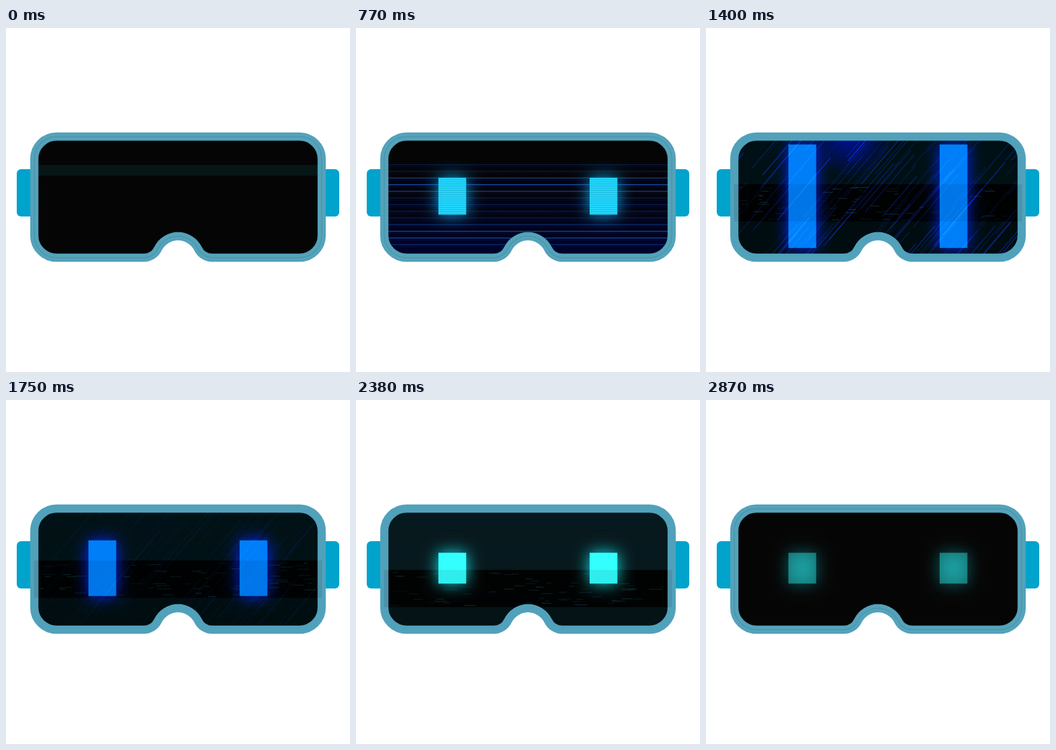
These frames come from a looping animation (480x480 px, 2940 ms). An HTML page with a canvas:

```html
<!DOCTYPE html>
<html lang="en">
<head>
<meta charset="utf-8">
<title>Visor</title>
<style>
html, body { margin: 0; width: 100%; height: 100%; overflow: hidden; background: #fff; }
canvas { display: block; }
</style>
</head>
<body>
<canvas id="stage" width="480" height="480"></canvas>
<script>
const ctx = document.getElementById('stage').getContext('2d');
const LOOP = 2940, STEP = 70;
const HELD = [1, 3, 6, 35, 37]; // steps that repeat the one before
const LEFT = 39, WIDTH = 402, BAND = 52;

// Middle line of the rim, with the arch for the nose
const visor = new Path2D(`M70.5 151.5H409.5A31 31 0 0 1 440.5 182.5V289.5A31 31 0 0 1 409.5 320.5
  H288A22 22 0 0 1 268 308A31.2 31.2 0 0 0 212 308A22 22 0 0 1 192 320.5
  H70.5A31 31 0 0 1 39.5 289.5V182.5A31 31 0 0 1 70.5 151.5Z`);

// Smooth step from 0 to 1 between two times
function ease(t, from, to) {
  const p = Math.min(1, Math.max(0, (t - from) / (to - from)));
  return p * p * (3 - 2 * p);
}
// Rises from a to b, falls from c to d
const pulse = (t, a, b, c, d) => ease(t, a, b) - ease(t, c, d);

const rgb = (c, alpha = 1) => `rgba(${c.map(Math.round).join()},${alpha})`;
const mix = (a, b, p) => a.map((v, i) => v + (b[i] - v) * p);

function random(seed) {
  let s = seed * 7919 + 17;
  return () => (s = (s * 16807 + 11) % 2147483647) / 2147483647;
}

function box(color, x, y, w, h) {
  ctx.fillStyle = color;
  ctx.fillRect(x, y, w, h);
}

const bar = (color, y, h) => box(color, LEFT, y, WIDTH, h);

function drawEyes(t) {
  const blue = pulse(t, 600, 1050, 1800, 2170);
  const h = 43 + 102.5 * pulse(t, 690, 1140, 1360, 2000);
  ctx.save();
  ctx.globalAlpha = ease(t, 350, 700) - 0.6 * ease(t, 2520, 2870);
  ctx.shadowColor = rgb(mix([20, 230, 240], [0, 40, 255], blue));
  ctx.shadowBlur = 22;
  for (const x of [115, 326]) {
    box(rgb(mix([51, 255, 255], [0, 126, 248], blue)), x, 234.7 - h / 2, 38.7, h);
  }
  ctx.restore();
}

function drawStreaks(t, power) {
  const navy = ctx.createLinearGradient(0, 165, 0, 316);
  navy.addColorStop(0, 'rgba(0,2,8,0)');
  navy.addColorStop(1, `rgba(0,4,46,${power})`);
  bar(navy, 150, 176);
  for (let i = 0; i < 13; i++) {
    const y = 158 + (32 + i * 9.3 + (t - 770) * 0.1 + 157) % 157;
    const glow = Math.max(0, Math.cos(i * 0.84 - 2.5));
    bar(`rgba(25,95,210,${(0.25 + 0.5 * glow) * power})`, y, 1.4);
    bar(`rgba(0,20,150,${0.3 * power})`, y + 3, 1);
  }
}

function drawScanlines(alpha) {
  for (let y = 157; y < 318; y += 3) bar(`rgba(0,0,0,${alpha})`, y, 1);
}

function drawRays(t, power) {
  const rnd = random(23);
  ctx.save();
  ctx.globalCompositeOperation = 'lighter';
  const blob = ctx.createRadialGradient(200, 150, 0, 200, 150, 60);
  blob.addColorStop(0, `rgba(0,0,220,${0.6 * power * power})`);
  blob.addColorStop(1, 'rgba(0,0,220,0)');
  box(blob, 140, 150, 120, 60);
  for (let i = 0; i < 130; i++) {
    const foot = rnd() * 520 - 90, length = 30 + 110 * rnd(), speed = 0.1 + 0.2 * rnd();
    const y = 150 + (rnd() * 260 + 5000 - (t - 1400) * speed) % 260;
    const x = foot + (320 - y) * 0.85;
    ctx.strokeStyle = `rgba(22,42,220,${(0.1 + 0.5 * rnd()) * power})`;
    ctx.lineWidth = 0.6 + 0.7 * rnd();
    ctx.beginPath();
    ctx.moveTo(x, y);
    ctx.lineTo(x + length * 0.85, y - length);
    ctx.stroke();
  }
  ctx.restore();
}

function drawBand(step, top, tint) {
  const rnd = random(step);
  bar(`rgba(0,0,0,${0.25 * tint})`, top + BAND, 120);
  bar(`rgba(0,0,0,${0.9 * tint})`, top, BAND);
  for (let i = 0; i < 70; i++) {
    const alpha = (0.2 + 0.5 * rnd()) * tint;
    box(`rgba(16,58,66,${alpha})`, 42 + rnd() * 385, top + 2 + rnd() * 48, 5 + rnd() * 15, 1.2);
  }
}

function drawScreen(step, t, tint, top) {
  const lines = pulse(t, 420, 700, 840, 1190);
  const rays = pulse(t, 1050, 1330, 1400, 1890);

  bar('#050505', 140, 190);
  drawStreaks(t, lines);
  bar(rgb(mix([0, 17, 21], [7, 26, 31], ease(t, 1600, 2380)), tint), 140, 190);
  drawScanlines(0.16 * tint);
  drawBand(step, top, tint);
  if (t < 420) bar('#061616', 158 + (33 + t * 0.35) % 145, 15);
  drawEyes(t);
  drawScanlines(0.12 * lines);
  drawRays(t, rays);
  bar(`rgba(0,0,0,${0.07 * tint})`, top, BAND);
}

function strokeRim(color, width) {
  ctx.strokeStyle = color;
  ctx.lineWidth = width;
  ctx.stroke(visor);
}

function draw(step) {
  const t = step * STEP, d = t - 1050;
  const tint = pulse(t, 770, 1050, 2380, 2660);
  const top = 213 + 0.0131 * d + 3.7e-6 * d * d; // the dark band sinks, gathering speed

  box('#fff', 0, 0, 480, 480);
  ctx.fillStyle = '#00a3cc';
  ctx.beginPath();
  ctx.roundRect(15, 197, 450, 66, 6);
  ctx.fill();

  ctx.save();
  ctx.clip(visor);
  drawScreen(step, t, tint, top);
  ctx.restore();

  strokeRim('#51a1bb', 11.5);
  if (!tint) {
    strokeRim('#5aa5b9', 6);
    strokeRim('#4c9ab3', 2.5);
  }
  for (const x of [LEFT, LEFT + WIDTH - 6]) box(`rgba(40,70,80,${0.15 * tint})`, x, top, 6, BAND);
}

function frame() {
  let step = Math.floor(performance.now() % LOOP / STEP);
  if (HELD.includes(step)) step--;
  draw(step);
  requestAnimationFrame(frame);
}
frame();
</script>
</body>
</html>
```
